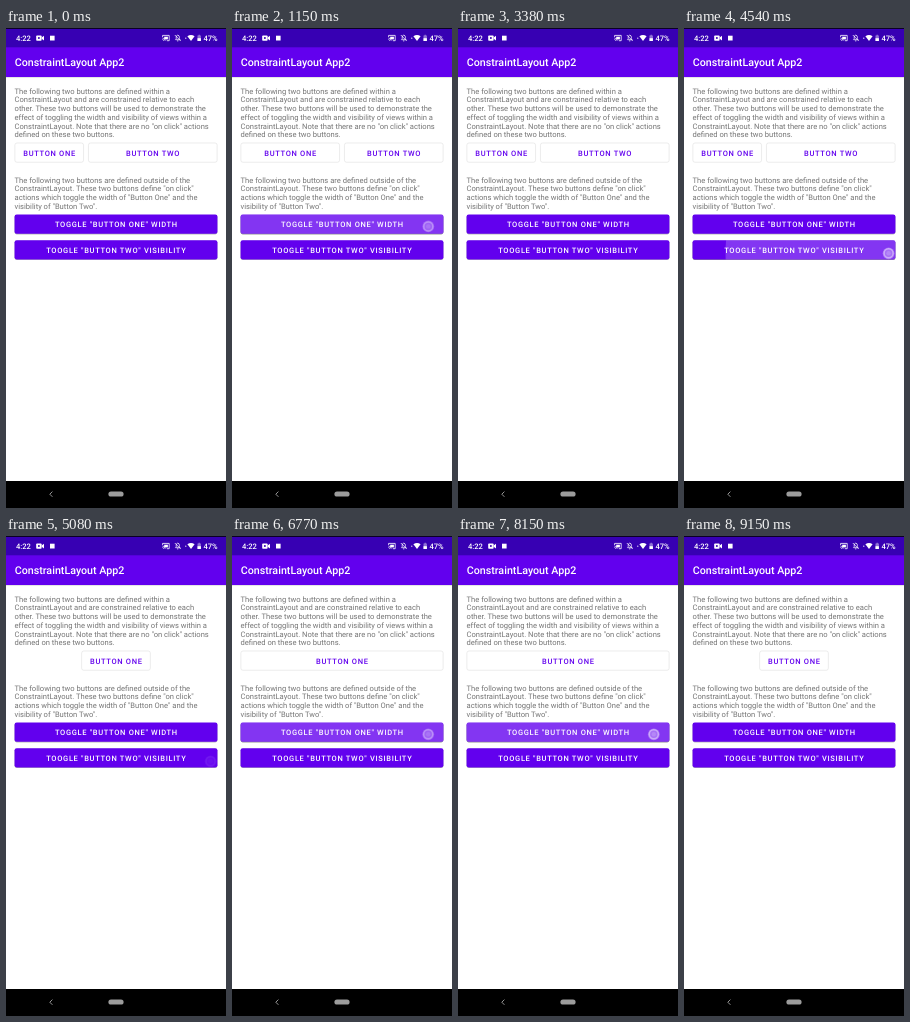
Recreate the animation shown at these times as an HTML page. Size 220 px wide and 480 px high, loop 9390 ms.

```html
<!DOCTYPE html>
<html lang="en">
<head>
<meta charset="utf-8">
<title>ConstraintLayout App2</title>
<style>
  html, body { margin: 0; width: 100%; height: 100%; overflow: hidden; background: #fff; }
  svg { display: block; width: 220px; height: 480px; }
  text { font-family: Roboto, Arial, sans-serif; font-size: 7.6px; white-space: pre; text-rendering: geometricPrecision; }
  .title { font-size: 10.69px; font-weight: 500; fill: #fff; }
  .status { font-weight: 500; fill: #fff; }
  .body { fill: #757575; }
  .label { font-size: 7.52px; font-weight: 500; letter-spacing: .0893em; text-anchor: middle; }
  .outlined rect { fill: #fff; stroke: #dfdfdf; stroke-width: .6; }
  .outlined text { fill: #6200ee; }
  .solid text { fill: #fff; }
</style>
</head>
<body>
<svg id="stage" viewBox="0 0 220 480">
  <defs>
    <linearGradient id="barShade" x1="0" y1="0" x2="0" y2="1">
      <stop offset="0" stop-color="#000" stop-opacity=".15"/>
      <stop offset="1" stop-color="#000" stop-opacity="0"/>
    </linearGradient>
    <filter id="soft" x="-5%" y="-30%" width="110%" height="170%">
      <feGaussianBlur stdDeviation=".7"/>
    </filter>
  </defs>
  <rect width="220" height="480" fill="#fff"/>
  <rect y="49" width="220" height="1.6" fill="url(#barShade)"/>
  <rect y="19" width="220" height="30" fill="#6200ee"/>
  <rect width="220" height="19.3" fill="#3700b3"/>
  <rect width="220" height=".8" fill="#000"/>
  <text class="title" x="8.7" y="37.9">ConstraintLayout App2</text>

  <g id="statusBar" fill="#fff">
    <text class="status" x="9.9" y="12.8">4:22</text>
    <!-- camera -->
    <rect x="30.2" y="7.4" width="5.4" height="5.4" rx=".8"/>
    <path d="M35.6 9.4 L38 7.7 V12.5 L35.6 10.8 Z"/>
    <circle cx="32.9" cy="10.1" r="1" fill="#3700b3"/>
    <rect x="44" y="7.7" width="4.6" height="4.8"/>
    <!-- cast -->
    <path d="M156.6 9 V7.4 H163.2 V12.7 H160.8" fill="none" stroke="#fff" stroke-width=".8"/>
    <rect x="158.2" y="8.7" width="3.7" height="2.7"/>
    <path d="M156.4 10 A2.8 2.8 0 0 1 159.2 12.8 M156.4 11.5 A1.3 1.3 0 0 1 157.7 12.8" fill="none" stroke="#fff" stroke-width=".7"/>
    <!-- muted bell -->
    <path d="M169.6 11.7 V11.3 L170.2 10.7 V9.2 Q170.2 7.5 171.8 7.1 Q173.4 7.5 173.4 9.2 V10.7 L174 11.3 V11.7 Z" fill="none" stroke="#fff" stroke-width=".75"/>
    <path d="M168.8 7 L174.8 13" stroke="#fff" stroke-width=".75"/>
    <circle cx="171.8" cy="12.8" r=".6"/>
    <circle cx="179.8" cy="10.2" r=".6"/>
    <!-- wifi -->
    <path d="M181.4 8.3 Q185 5.7 188.6 8.3 L185 12.9 Z"/>
    <!-- battery -->
    <path d="M191.5 7.5 H192.5 V6.8 H193.9 V7.5 H194.9 V13 H191.5 Z" fill-opacity=".45"/>
    <rect x="191.5" y="10.2" width="3.4" height="2.8"/>
    <text class="status" x="197.4" y="12.8">47%</text>
  </g>

  <g id="content"></g>

  <rect y="453" width="220" height="27" fill="#000"/>
  <path d="M46.4 463.6 L43.8 466.2 L46.4 468.8" fill="none" stroke="#a8a8a8" stroke-width=".9"/>
  <rect x="102.4" y="463.4" width="15.2" height="5.2" rx="2.6" fill="#9c9c9c"/>

  <g id="touch" fill="#fff">
    <circle r="5.9" fill-opacity=".3"/>
    <circle r="4.5" fill="none" stroke="#fff" stroke-opacity=".4" stroke-width="1.5"/>
    <circle r="2.2" fill-opacity=".15"/>
  </g>
</svg>
<script>
const LOOP = 9390;
const LEFT = 8.56, RIGHT = 211.44, GAP = 4.28, NARROW = 69.3;
const BUTTON_H = 19.25, LINE_H = 8.773;

// Taps: finger down, ripple start, finger up
const taps = [
  { on: "width", down: 380, ripple: 620, up: 1080, x: 196.3, y: 198.4 },
  { on: "width", down: 2460, ripple: 2620, up: 2990, x: 196.3, y: 198.4 },
  { on: "visibility", down: 4230, ripple: 4380, up: 4830, x: 204.6, y: 225.3 },
  { on: "width", down: 6080, ripple: 6230, up: 6700, x: 196.2, y: 198.3 },
  { on: "width", down: 7700, ripple: 7840, up: 8310, x: 195.8, y: 198.3 }
];

const content = document.getElementById("content");
const touch = document.getElementById("touch");
const clamp = v => Math.min(1, Math.max(0, v));
const easeOut = v => 1 - (1 - v) ** 2;

function add(parent, tag, attrs, label) {
  const node = document.createElementNS("http://www.w3.org/2000/svg", tag);
  set(node, attrs);
  if (label) node.textContent = label;
  return parent.appendChild(node);
}

function set(node, attrs) {
  for (const key in attrs) node.setAttribute(key, attrs[key]);
}

function paragraph(baseline, lines) {
  lines.forEach((line, i) =>
    add(content, "text", { class: "body", x: LEFT, y: baseline + i * LINE_H }, line));
}

// The offset balances the letter spacing after the last letter
function addLabel(parent, x, y, label) {
  return add(parent, "text", { class: "label", x: x + .33, y: y + 12.57 }, label);
}

function outlinedButton(label) {
  const y = 115;
  const group = add(content, "g", { class: "outlined" });
  const box = add(group, "rect", { y, height: BUTTON_H, rx: 2.1 });
  const text = addLabel(group, 0, y, label);
  return (x1, x2) => {
    set(box, { x: x1 + .3, width: x2 - x1 - .6 });
    set(text, { x: (x1 + x2) / 2 + .33 });
    return group;
  };
}

function solidButton(id, y, label) {
  const frame = { x: LEFT, y, width: RIGHT - LEFT, height: BUTTON_H, rx: 2.1 };
  const group = add(content, "g", { class: "solid" });
  const shade = add(group, "rect", { ...frame, y: y + .7, filter: "url(#soft)" });
  add(group, "rect", { ...frame, fill: "#6200ee" });
  add(add(group, "clipPath", { id }), "rect", frame);
  const wave = add(group, "circle", { fill: "#fff", "clip-path": `url(#${id})` });
  addLabel(group, 110, y, label);
  return { shade, wave };
}

paragraph(65.5, [
  "The following two buttons are defined within a",
  "ConstraintLayout and are constrained relative to each",
  "other. These two buttons will be used to demonstrate the",
  "effect of toggling the width and visibility of views within a",
  "ConstraintLayout. Note that there are no \"on click\" actions",
  "defined on these two buttons."
]);
const placeOne = outlinedButton("BUTTON ONE");
const placeTwo = outlinedButton("BUTTON TWO");
paragraph(154.7, [
  "The following two buttons are defined outside of the",
  "ConstraintLayout. These two buttons define \"on click\"",
  "actions which toggle the width of \"Button One\" and the",
  "visibility of \"Button Two\"."
]);
const solid = {
  width: solidButton("width", 186.5, "TOGGLE \"BUTTON ONE\" WIDTH"),
  visibility: solidButton("visibility", 212.15, "TOOGLE \"BUTTON TWO\" VISIBILITY")
};

function layOut(wide, hidden) {
  const half = (RIGHT - LEFT - GAP) / 2;
  let start = LEFT, end = LEFT + (wide ? half : NARROW);
  if (hidden) {
    start = wide ? LEFT : 110 - NARROW / 2;
    end = 220 - start;
  }
  placeOne(start, end);
  placeTwo(hidden ? LEFT : end + GAP, RIGHT).style.display = hidden ? "none" : "";
}

function draw(t) {
  const toggled = id => taps.filter(tap => tap.on === id && t >= tap.up).length % 2 === 1;
  layOut(toggled("width"), toggled("visibility"));

  const tap = taps.filter(item => t >= item.down).pop();
  const fade = tap ? 1 - clamp((t - tap.up) / 300) : 0;
  set(touch, { opacity: fade });
  if (tap) set(touch, { transform: `translate(${tap.x} ${tap.y})` });

  for (const id in solid) {
    const { shade, wave } = solid[id];
    const active = tap && tap.on === id && t >= tap.ripple;
    const grow = active ? clamp((t - tap.ripple) / 300) : 0;
    const glow = active ? clamp(grow * 3) * (1 - clamp((t - tap.up - 70) / 180)) : 0;
    set(shade, { "fill-opacity": .28 + .15 * glow });
    set(wave, { r: active ? 6 + 200 * easeOut(grow) : 0, "fill-opacity": .21 * glow });
    if (active) set(wave, { cx: tap.x, cy: tap.y });
  }
}

function tick() {
  draw(performance.now() % LOOP);
  requestAnimationFrame(tick);
}
tick();
</script>
</body>
</html>
```
